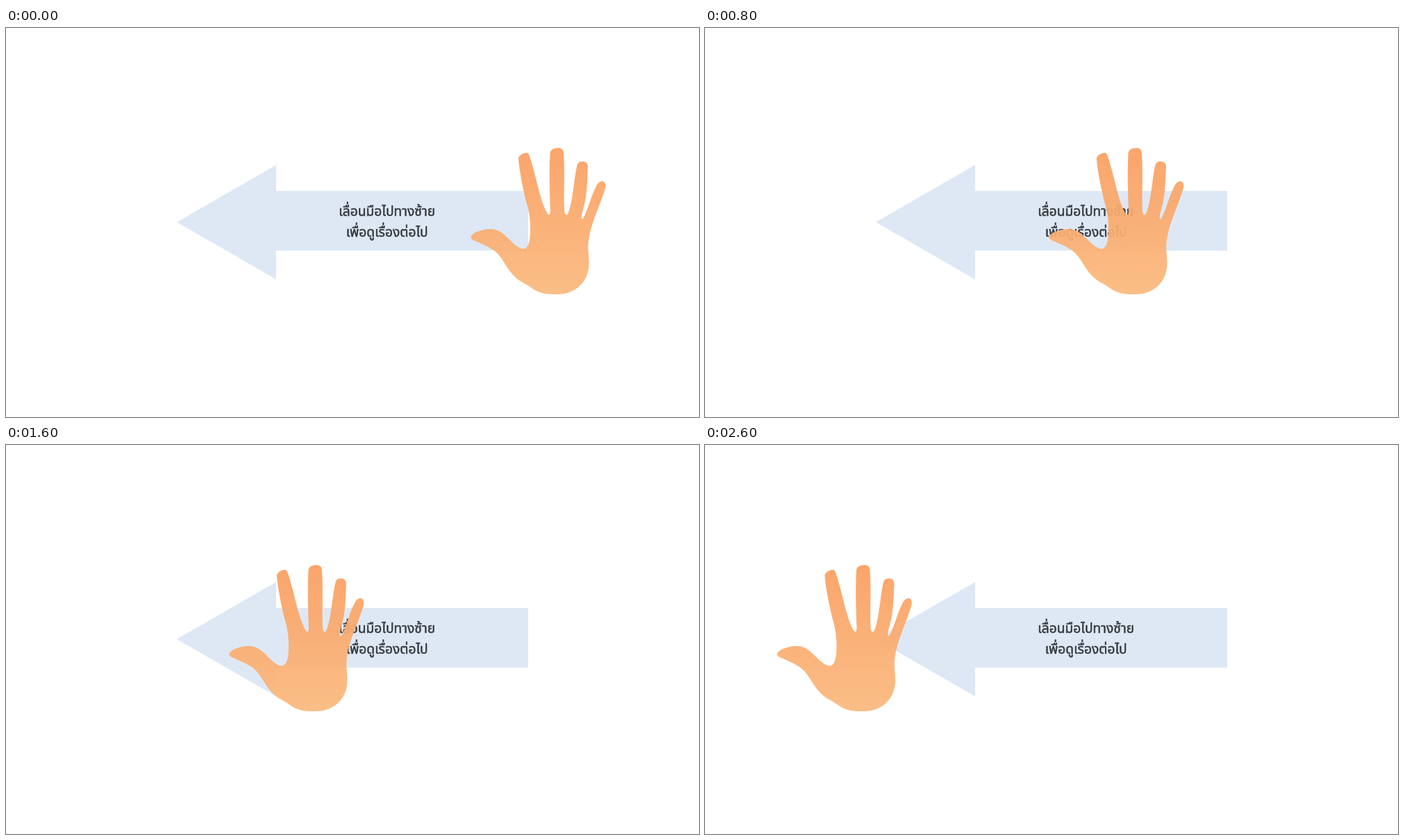
Recreate the animation shown at these times as an HTML page with a canvas. Size 998 by 561 pixels, loop 2.7 s.

```html
<!DOCTYPE html>
<html lang="th">
<head>
<meta charset="utf-8">
<style>
  html, body { margin: 0; width: 100%; height: 100%; overflow: hidden; background: #fff; }
  canvas { display: block; }
</style>
</head>
<body>
<canvas id="stage" width="998" height="561"></canvas>
<script>
const ctx = document.getElementById('stage').getContext('2d');
const LOOP = 2700, STEP = 100, STEP_PX = 21.75;

const arrow = new Path2D('M246 280 L389 197.5 V235 H752 V321 H389 V362.5 Z');

const hand = new Path2D(`
  M669.5 301.5 C670 296 684 290 698 290 C719 290 727 314 744 318.5
  C753 319 755 306 755 288 C755 269 751 257 748 246
  C744 229 740 209 738 190 C737 185 744 179.5 750 180 C752 180 753 182 754 185
  C763.5 213 769.5 252 780 268 C782 271 784 269 784 264
  C783 238 782 209 783.5 181 C783.5 176 789 173 795 173 C800 173 802.5 175 803 180
  C805 208 803 238 804 261 C804 270 807 271 809 268
  C816 255 818 216 822.5 198 C824 193 827 192.5 830 192.5 C835 192.5 838 195 838 200
  C837 222 837 242 831 262 C829 270 827 277 831 275
  C838 262 842 244 850 228 C853 222 856 221 859 221 C863 222 864 226 863 231
  C856 255 842 282 839 306 C837 319 840 329 839.5 342
  C838 369 817 384 795 384 C764 385 761 376 746 368
  C723 356 720 337 706.5 324 C697 315 680 309.5 672 305.5 Q669.5 304 669.5 301.5 Z`);

const skin = ctx.createLinearGradient(0, 173, 0, 384);
skin.addColorStop(0, '#fa9e60');
skin.addColorStop(1, '#fab97d');

function drawLine(text, y) {
  ctx.fillText(text, 548.7, y);
  ctx.strokeText(text, 548.7, y);
}

function drawText() {
  ctx.fillStyle = ctx.strokeStyle = '#35383d';
  ctx.lineWidth = 0.5;
  ctx.lineJoin = 'round';
  ctx.font = '500 19.2px "Noto Sans Thai Looped", "Noto Sans Thai", "Noto Sans", sans-serif';
  ctx.textAlign = 'center';
  drawLine('เลื่อนมือไปทางซ้าย', 271);
  drawLine('เพื่อดูเรื่องต่อไป', 301);
}

function drawHand(shift) {
  ctx.save();
  ctx.translate(-shift, 0);
  ctx.globalAlpha = 0.93;
  ctx.fillStyle = skin;
  ctx.fill(hand);
  ctx.restore();
}

function frame(now) {
  ctx.fillStyle = '#fff';
  ctx.fillRect(0, 0, 998, 561);
  ctx.fillStyle = '#dee8f5';
  ctx.fill(arrow);
  drawText();
  drawHand(Math.floor(now % LOOP / STEP) * STEP_PX);
  requestAnimationFrame(frame);
}
frame(0);
</script>
</body>
</html>
```
